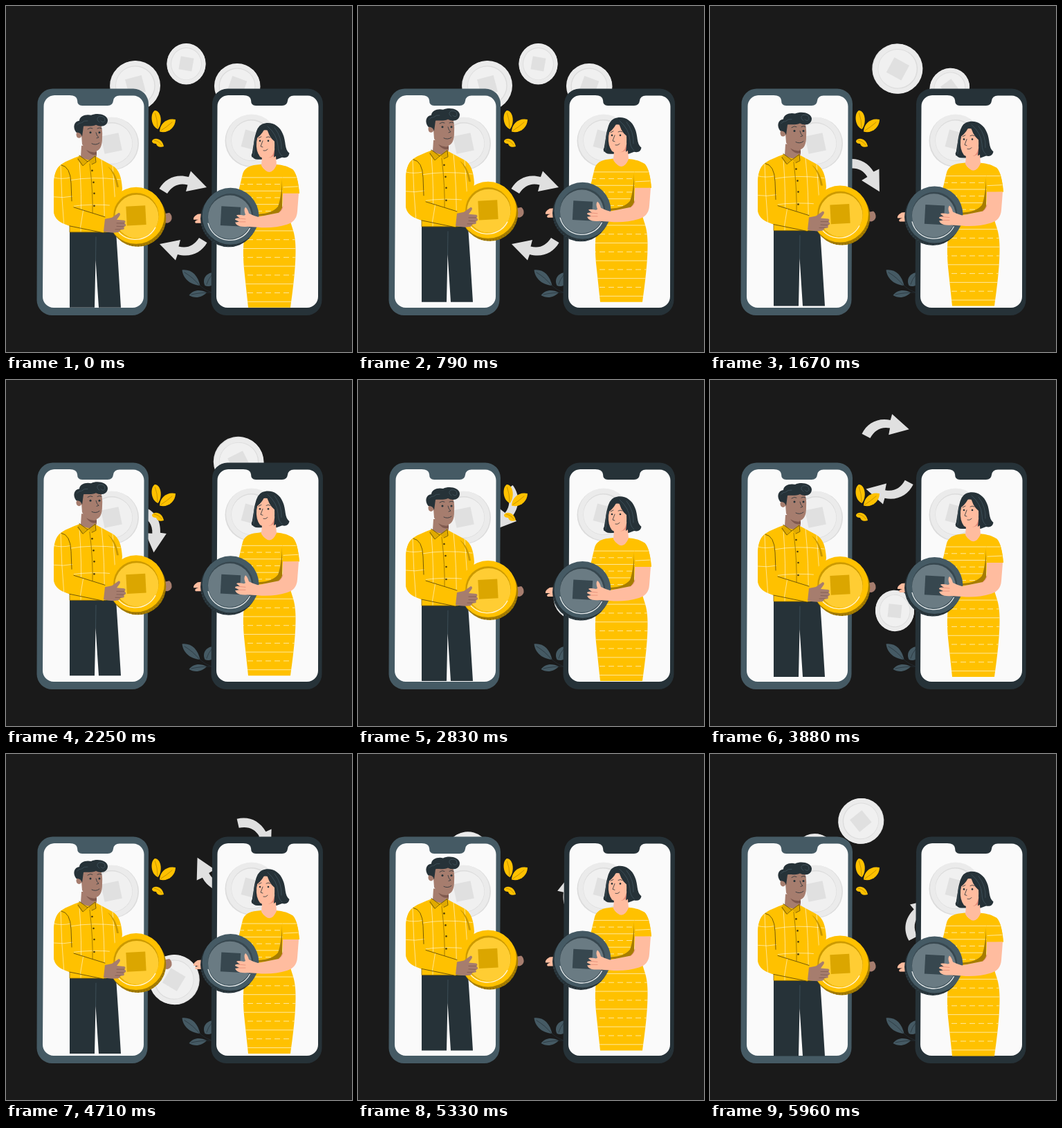
An HTML page for the animation above (6000 ms loop, 500 px wide and 500 px high).

```html
<!DOCTYPE html>
<html lang="en">
<head>
<meta charset="utf-8">
<title>Coin exchange</title>
<style>
  html, body { margin: 0; width: 100%; height: 100%; overflow: hidden; background: #1a1a1a; }
  svg { display: block; width: 100%; height: 100%; }
  .line { fill: none; stroke-linecap: round; stroke-linejoin: round; }
  .ink { stroke: #263238; stroke-width: .8; }
  .gold { fill: #ffc100; }
  .dark { fill: #263238; }
  .tan { fill: #a67d6e; }
  .pink { fill: #ffbc9f; }
  .weave { stroke: #fff; stroke-width: .7; opacity: .8; }
</style>
</head>
<body>
<svg viewBox="0 0 500 500">
  <defs>
    <path id="arrow" fill="#e0e0e0" d="M221.500 264C230 249 246 242 264 247L267 238.500L290 262L260 268L262.500 258.500C250 255 240 260 233 271Z"/>
    <clipPath id="shirtClip"><path id="shirtShape" d="M106 217C96 221 87 224 80 229C71 236 69 246 69 262L69 297C70 308 79 313 92 318L92 327H160L168 264C167 247 163 236 154 231L130 218Z"/></clipPath>
    <clipPath id="sleeveClip"><path id="sleeveShape" d="M79 230C71 236 69 248 69 262V296C69 309 80 315 96 319L141 328L144 305L98 291L94 256C93 240 89 228 79 230Z"/></clipPath>
    <clipPath id="dressClip"><path id="dressShape" d="M369 229C357 230 346 231 342 243L336 268L351 285L350 312C342 334 342 356 344 380L350 436H411C416 402 420 364 418 341C417 328 414 322 411 312L399 301L400 272L424 271C422 254 420 239 412 235C405 231 398 230 390 229C387 241 373 242 369 229Z"/></clipPath>
  </defs>

  <rect width="500" height="500" fill="#1a1a1a"/>
  <g id="orbit"></g>

  <!-- sprigs -->
  <g class="gold">
    <path d="M219.500 178C209 174 208 155 215 151C224 151 227 169 219.500 178Z"/>
    <path d="M222 181.500C222 170 233 161 245 164C245 176 233 185 222 181.500Z"/>
    <path d="M211 195C214 189 226 191 228 203C222 205 218 203 217 199C214 199 211 198 211 195Z"/>
  </g>
  <path class="line" stroke="#a07800" stroke-width=".6" d="M219 176Q219 164 215.500 155M224 180Q232 175 240 168M214 194Q221 195 225 201"/>
  <g fill="#455a64">
    <path d="M280.500 404C266 403 256 394 254.500 381.500C268 380 277 389 280.500 404Z"/>
    <path d="M287.500 404C283 395 289 386 299 385V403C295 405 291 406 287.500 404Z"/>
    <path d="M264.500 418C270 410 281 409 290 414C283 422 272 423 264.500 418Z"/>
  </g>
  <path class="line" stroke="#263238" stroke-width=".7" d="M258 385Q270 392 280 404Q288 411 297 414M290 402Q292 395 297 389M268 417Q280 414 297 414"/>

  <!-- phones -->
  <path fill="#455a64" d="M68 119.500H184A22 22 0 0 1 206 142L204.500 425A22 22 0 0 1 182 447H67A22 22 0 0 1 44.500 425L45.500 142A22 22 0 0 1 68 119.500Z"/>
  <path fill="#fafafa" d="M70 129H92Q102 129 103 136Q103 144 110 144H147Q154 144 155 137Q156 129.500 164 129.500H184A15.500 16 0 0 1 199.500 145L199 420A16 16 0 0 1 183 436H69A16 16 0 0 1 53 420L54.500 145A16 16 0 0 1 70 129Z"/>
  <path fill="#263238" d="M320 119.500H436A22 22 0 0 1 458 142L456.500 425A22 22 0 0 1 434 447H318A22 22 0 0 1 296.500 425L298 142A22 22 0 0 1 320 119.500Z"/>
  <path fill="#fafafa" d="M321 129H343Q353 129 354 136Q354 144 361 144H399Q406 144 407 137Q408 129.500 416 129.500H436A15.500 16 0 0 1 451.500 145L451 420A16 16 0 0 1 435 436H320A16 16 0 0 1 304 420L305.500 145A16 16 0 0 1 321 129Z"/>
  <g id="inner"></g>

  <g class="bob">
    <!-- man -->
    <path class="tan" d="M226 301L236 299Q240 302 239.500 308Q238 313 233 314L226 313Z"/>
    <path class="dark" d="M92 326H159L162 372L166 436H134L129.500 366L128 436H92Z"/>
    <path class="line" stroke="#455a64" stroke-width=".7" d="M129.500 367L130 334"/>
    <use href="#shirtShape" class="gold"/>
    <g clip-path="url(#shirtClip)">
      <path class="line weave" d="M106 224Q110 270 108 327M138 222Q143 270 142 327M154 230L159 300M92 252Q125 246 165 251M92 290Q125 285 160 289"/>
    </g>
    <path class="line" stroke="#8c6a00" stroke-width=".8" d="M121 228Q126 270 125 302M92 318V327H144"/>
    <path fill="#c89700" d="M147 232Q157 242 160 262L163 262Q159 240 147 232Z"/>
    <g fill="#4e3d08">
      <circle cx="124.500" cy="238" r="1.300"/><circle cx="126.500" cy="255" r="1.300"/>
      <circle cx="127.500" cy="271" r="1.300"/><circle cx="127.500" cy="289" r="1.300"/>
    </g>
    <use href="#sleeveShape" class="gold"/>
    <g clip-path="url(#sleeveClip)">
      <path class="line weave" d="M79 230Q80 275 84 320M69 248Q80 251 94 248M69 276Q82 278 97 275M112 293L107 323"/>
    </g>
    <path class="line" stroke="#4e3d08" stroke-width=".8" d="M80 230Q93 232 94 256L95 282M98 291L143 305M92 318L141 328"/>
    <path class="tan" d="M109 202H131L131 217Q123 228 108 218Z"/>
    <path fill="#7f594f" d="M116 208Q124 213 131 211V215Q122 217 116 208Z"/>
    <path fill="#e0aa00" d="M106 216L118 225L129 216L130 225L124 229L118 224L110 231L103 222Z"/>
    <path class="line" stroke="#4e3d08" stroke-width=".7" d="M106 216L118 225L111 231L104 221M118 225L129 217L130 226L124 229"/>
    <path class="tan" d="M108 173L136 169Q140 177 139 191Q139 208 130 210Q117 212 110 200Z"/>
    <ellipse class="tan" cx="105.500" cy="186" rx="4" ry="5"/>
    <path class="dark" d="M101.500 183C96 176 98 167 106 166C106 159 116 156 123 158C131 154 146 156 147 165C147 174 137 176 130 172C123 175 116 173 112 174L110 189Q108 182 101.500 183Z"/>
    <path class="line" stroke="#455a64" stroke-width=".7" d="M135 168Q129 164 134 160Q143 158 143 166Q140 170 137 166M109 169Q113 165 118 166M103 172Q105 169 108 169"/>
    <path class="line ink" d="M118 178Q122 175 125 177M132 177Q135 175 138 177M130 183Q131 188 134 190L131 191M124 199Q130 202 135 198"/>
    <circle class="dark" cx="122" cy="183" r="1.500"/><circle class="dark" cx="135" cy="183" r="1.500"/>

    <!-- woman -->
    <path class="pink" d="M288 300L277 301Q270 305 271 309L278 309Q271 311 274 314L288 314Z"/>
    <path class="dark" d="M370 171C382 166 395 172 400 185C405 196 402 207 409.500 213Q408 221 399 219L391 222H364Q357 222 354.500 216C359 208 357 198 360 188Q363 174 370 171Z"/>
    <use href="#dressShape" class="gold"/>
    <g id="stripes" clip-path="url(#dressClip)" stroke="#fff3c4" stroke-width=".8"></g>
    <path fill="#a67d00" d="M399 250Q398 277 393 290Q385 300 365 301L362 304L399 302Z"/>
    <path class="gold" d="M399 236L414 236Q422 245 424 271H400Z"/>
    <path class="line" stroke="#fff3c4" d="M400 248H419M401 262L422 261" stroke-width=".8"/>
    <path class="pink" d="M371 206H389L391 230Q382 250 369 231Z"/>
    <path fill="#e88f7b" d="M373 218Q383 217 388 208L389 215Q382 222 373 218Z"/>
    <path class="pink" d="M364 184Q371 178 379 180L388 194Q390 211 383 218Q374 223 367 218Q361 210 362 197Z"/>
    <path class="dark" d="M376 173Q371 185 363 191Q359 204 362 214L355 219Q359 187 365 177Q374 168 386 172L398 212L387 219Q389 203 388 196Q379 189 376 173Z"/>
    <path class="line" stroke="#455a64" stroke-width=".7" d="M378 174Q392 186 393 202Q393 212 399 217M388 176Q399 190 398 207M361 191Q358 204 358 216"/>
    <path class="line ink" d="M365 191L369 189M376 190Q379 188 382 190M371 195L368 203L371 204M372 209Q376 210 378 207"/>
    <circle class="dark" cx="367" cy="195" r="1.300"/><circle class="dark" cx="379" cy="195" r="1.300"/>
  </g>

  <g class="bob" id="held"></g>

  <g class="bob">
    <path class="tan" d="M143 308L153 306L163 299Q167 300 163 305L160 309L171 310Q174 312 171 314L173 316Q174 319 170 319L171 322Q170 324 166 323L163 327Q154 329 141 326Z"/>
    <path class="line" stroke="#6f4c43" stroke-width=".6" d="M160 314L171 314M160 318.500L171 319M158 323L167 323"/>
    <path class="pink" d="M400 271H423L421 297Q420 312 406 316Q386 322 364 320L349 319Q338 320 333 316L331 313L337 312L331 309Q331 306 338 307L333 303Q334 301 344 303L346 302Q343 294 346 291Q349 293 351 300Q357 303 364 305L394 299Q400 294 400 286Z"/>
    <path class="line" stroke="#e08570" stroke-width=".7" d="M336 307L346 308M337 312L346 312M394 299Q399 296 400 290"/>
  </g>
</svg>
<script>
const $ = id => document.getElementById(id);
const PIVOT = [259.5, 208.7];
const GOLD = { side: '#a67d00', face: '#ffc100', ring: '#cc9a00', disc: '#ffcd33', mark: '#dba600', arc: '#fff6d8' };
const SLATE = { side: '#263238', face: '#455a64', ring: '#37474f', disc: '#6a7b83', mark: '#37474f', arc: '#e8eced' };
const PALE = { side: '#dcdcdc', face: '#ebebeb', ring: '#dcdcdc', disc: '#f0f0f0', mark: '#e0e0e0' };

// dx, dy push the edge of the coin out from under its face
function coin(x, y, rx, ry, dx, dy, turn, c) {
  const oval = (k, fill, sx = 0, sy = 0) =>
    `<ellipse cx="${sx}" cy="${sy}" rx="${rx * k}" ry="${ry * k}" fill="${fill}"/>`;
  const m = rx * .68, a = rx * .79;
  const arc = c.arc ? `<path class="line" stroke="${c.arc}" stroke-width="1.3"
    d="M${-a} ${ry * .25}A${a} ${ry * .78} 0 0 0 ${a * .86} ${ry * .42}"/>` : '';
  return `<g transform="translate(${x} ${y})">${oval(1, c.side, dx, dy)}${oval(1, c.face)}
    ${oval(.8, c.ring)}${oval(.77, c.disc, dx * .4, dy * .35)}${arc}
    <rect x="${-m / 2}" y="${-m / 2}" width="${m}" height="${m}" fill="${c.mark}" transform="rotate(${turn})"/></g>`;
}

function ridges(x, y, r, from, to, color) {
  let d = '';
  for (let deg = from; deg <= to; deg += 6) {
    const a = deg * Math.PI / 180, cx = Math.cos(a), cy = Math.sin(a);
    d += `M${x + r * cx} ${y + r * cy}l${cx * 2} ${cy * 2}`;
  }
  return `<path d="${d}" stroke="${color}" stroke-width=".6"/>`;
}

$('orbit').innerHTML =
  coin(187, 115, 36, 36, -1, .6, -15, PALE) +
  coin(260.5, 83.5, 28, 29.5, 0, .5, 10, PALE) +
  coin(334, 115.5, 33, 32.5, .5, .8, 20, PALE) +
  '<use href="#arrow"/><use href="#arrow" transform="rotate(180 256 303)"/>';

$('inner').innerHTML =
  coin(152.5, 198.5, 38, 38, 1.5, .5, -12, PALE) +
  coin(355, 194, 37, 37.5, -1.5, 1, 15, PALE);

$('held').innerHTML =
  coin(188, 303, 41, 41, 2.3, 4, -3, GOLD) + ridges(189.3, 305.8, 40, 15, 105, '#6b5100') +
  coin(324.5, 304, 41, 41, -2.5, 3.5, 3, SLATE) + ridges(322.8, 306.5, 40, 75, 165, '#455a64');

const stripe = (y, dashed) => `<path d="M336 ${y}H424" ${dashed ? 'stroke-dasharray="8 5"' : ''}/>`;
let rows = '';
for (let i = 0; i < 6; i++) rows += stripe(248 + i * 9.7, i % 2);
for (let i = 0; i < 9; i++) rows += stripe(325 + i * 12.8, i % 2);
$('stripes').innerHTML = rows;

const LOOP = 6000, LEAD = 55;
const bobs = document.querySelectorAll('.bob');

function draw(now) {
  const t = now % LOOP + LEAD;
  const lift = 10 * (1 - Math.abs(t % 1500 / 750 - 1));
  const angle = Math.max(0, t - 1000) * .06;
  bobs.forEach(g => g.setAttribute('transform', `translate(0 ${.6 - lift})`));
  $('orbit').setAttribute('transform', `rotate(${angle} ${PIVOT})`);
}

let start;
function tick(now) {
  start ??= now;
  draw(now - start);
  requestAnimationFrame(tick);
}
draw(0);
requestAnimationFrame(tick);
</script>
</body>
</html>
```
